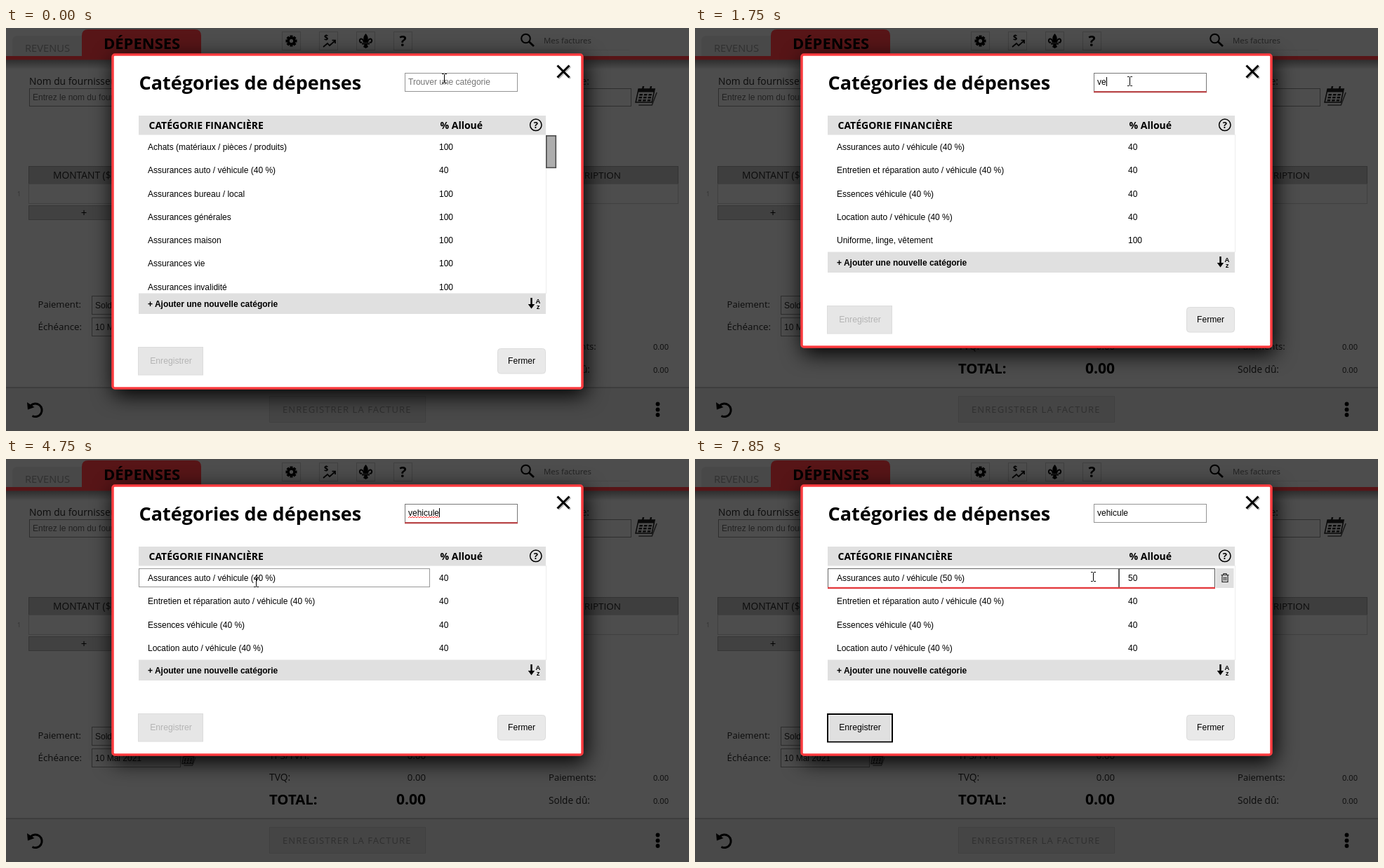
Write an HTML page that moves like this. It is 973 by 575 pixels and loops after 8 s.

```html
<!DOCTYPE html>
<html lang="fr">
<head>
<meta charset="utf-8">
<title>Catégories de dépenses</title>
<style>
html, body { margin: 0; width: 100%; height: 100%; overflow: hidden; background: #4d4d4d; }
svg { display: block; }
text { font-family: "Liberation Sans", Arial, sans-serif; white-space: pre; }
.ui { font-family: "Open Sans", "Noto Sans", sans-serif; }
.b { font-weight: 700; }
.mid { text-anchor: middle; }
.end { text-anchor: end; }
#frame { filter: drop-shadow(3px 8px 15px #000); }
</style>
</head>
<body>
<svg width="973" height="575" viewBox="0 0 973 575">
  <linearGradient id="shade" x2="0" y2="1">
    <stop stop-opacity=".4"/>
    <stop offset="1" stop-opacity="0"/>
  </linearGradient>
  <g id="page"></g>
  <rect id="frame" x="152" y="38" width="669" rx="3" fill="#fff" stroke="#fd3b3f" stroke-width="3.5"/>
  <g id="dialog"></g>
</svg>
<script>
const $ = id => document.getElementById(id);
const text = (x, y, s, size = 12, cls = '', fill = '#000', extra = '') =>
  `<text x="${x}" y="${y}" font-size="${size}" class="${cls}" fill="${fill}" ${extra}>${s}</text>`;
const box = (x, y, w, h, fill, stroke = 'none', extra = '') =>
  `<rect x="${x}" y="${y}" width="${w}" height="${h}" fill="${fill}" stroke="${stroke}" ${extra}/>`;
const line = (d, width = 1, color = '#000', extra = '') =>
  `<path d="${d}" fill="none" stroke="${color}" stroke-width="${width}" ${extra}/>`;
const shape = (d, fill = '#000') => `<path d="${d}" fill="${fill}"/>`;

const pen = document.createElement('canvas').getContext('2d');
pen.font = '12px "Liberation Sans", Arial, sans-serif';
const widthOf = s => pen.measureText(s).width;

// Dimmed page behind the dialog
function calendar(x, y, k) {
  let s = line('M8 27H27L30 9', 1.6, '#1a1a1a') + box(3, 4, 23, 19, '#4d4d4d', '#0a0a0a', 'stroke-width="1.6"');
  s += box(3, 4, 23, 4.5, '#0a0a0a');
  for (let i = 0; i < 9; i++) s += box(6 + i % 3 * 6.5, 11 + (i / 3 | 0) * 4, 4.5, 2.6, '#0a0a0a');
  s += line('M9 0V5M20 0V5', 2.5, '#0a0a0a');
  return `<g transform="translate(${x} ${y}) scale(${k}) skewX(-12)">${s}</g>`;
}

function gear(x, y) {
  let s = '';
  for (let i = 0; i < 8; i++) s += box(-2, -8, 4, 5, '#000', 'none', `transform="rotate(${i * 45})"`);
  return `<g transform="translate(${x} ${y})">${s}<circle r="4.3" fill="none" stroke="#000" stroke-width="3.2"/></g>`;
}

function drawPage() {
  const ink = '#0c0c0c', edge = '#2e2e2e', soft = '#222', red = '#571517';
  let s = box(0, 0, 973, 575, '#4d4d4d');
  s += shape('M9 40V19Q9 11 17 11H108V40Z', '#484848') + box(0, 40, 973, 5.5, red) + box(0, 45.5, 973, 14, 'url(#shade)');
  s += shape('M108 41V11Q108 2 117 2H269Q278 2 278 11V41Z', red);
  s += text(27, 34, 'REVENUS', 14.7, 'ui', '#303030') + text(139, 30, 'DÉPENSES', 22, 'ui b');

  for (const x of [393.5, 446.5, 499.5, 552.5]) s += box(x, 5.5, 26, 26, '#4d4d4d', '#404040');
  s += gear(406.5, 18.5);
  s += text(453, 17, '$', 11, 'ui b') + line('M452 27L458 22L461 25L469 18M464.5 17.5H469V22', 1.7);
  s += shape('M512.5 8C518 14 515 18 514 21H511C510 18 507 14 512.5 8Z');
  s += line('M510 21C509 14 503 14 504 19Q505 22 507 20M515 21C516 14 522 14 521 19Q520 22 518 20M507 22.5H518', 2);
  s += shape('M511 23H514L516 27L512.5 29L509 27Z');
  s += text(565.5, 26, '?', 21, 'ui b mid');
  s += '<circle cx="740.5" cy="15" r="6.3" fill="none" stroke="#000" stroke-width="2"/>' + line('M745 19.5L752 26', 2.8);
  s += text(766, 22, 'Mes factures', 11.4, 'ui', soft) + line('M733 31.5H888', 1, '#484848');

  s += text(33, 81, 'Nom du fournisseur:', 13.8, 'ui', ink) + box(33.5, 86.5, 300, 25, '#4d4d4d', edge);
  s += text(38, 103, 'Entrez le nom du fournisseur', 12, '', soft);
  s += text(831, 81, 'Date:', 13.8, 'ui end', ink) + box(690.5, 86.5, 200, 25, '#4d4d4d', edge) + calendar(899, 83, 1);

  s += box(32.5, 197.5, 925, 25, '#3e3e3e', '#333') + box(32.5, 222.5, 925, 28, '#4d4d4d', '#404040');
  s += text(67, 215, 'MONTANT ($)', 13.8, 'ui', ink) + text(876, 215, 'DESCRIPTION', 13.5, 'ui end', ink);
  s += text(16, 240, '1', 9, 'ui', '#343434') + box(32.5, 253.5, 160, 20, '#414141', '#363636');
  s += text(111, 269, '+', 15, 'ui mid');

  s += text(45.5, 399, 'Paiement:', 13.1, 'ui', ink) + text(45.5, 430.5, 'Échéance:', 13.4, 'ui', ink);
  s += box(122.5, 382.5, 126, 26, '#4d4d4d', edge) + text(127, 400, 'Solde dû', 12, '', ink);
  s += box(122.5, 413.5, 126, 26, '#4d4d4d', edge) + text(127, 431, '10 Mai 2021', 12, '', ink);
  s += calendar(252, 420, .64);

  s += text(375, 428, 'TPS/TVH:', 13.5, 'ui', ink) + text(598, 428, '0.00', 13.2, 'ui end', ink);
  s += text(375, 459, 'TVQ:', 13.8, 'ui', ink) + text(598, 458.5, '0.00', 13.2, 'ui end', ink);
  s += text(375, 493, 'TOTAL:', 20.3, 'ui b') + text(598, 493, '0.00', 21, 'ui b end');
  s += text(773, 459, 'Paiements:', 13.1, 'ui', ink) + text(944, 459, '0.00', 11.1, 'ui end', ink);
  s += text(773, 491.5, 'Solde dû:', 13.6, 'ui', ink) + text(944, 491.5, '0.00', 11.1, 'ui end', ink);

  s += box(0, 513, 973, 62, '#494949') + line('M0 513H973', 1, '#303030');
  s += box(375.5, 525.5, 222, 37, '#454545', '#404040');
  s += text(394, 548.5, 'ENREGISTRER LA FACTURE', 13, 'ui', '#2f2f2f', 'letter-spacing="1.1"');
  s += line('M35 539A9.3 9.3 0 1 1 37.5 553.5', 3) + shape('M30 534L31 544.5L40.5 541Z');
  for (const y of [536.5, 544.5, 552]) s += `<circle cx="928.5" cy="${y}" r="2.9"/>`;
  $('page').innerHTML = s;
}

// Timeline
const LOOP = 8000, STEP = 50, ROW = 33.25, BLINK = 530;
const WORD = 'vehicule';
const typedAt = [1200, 1650, 2000, 2350, 2600, 2750, 3050, 3270];
const filteredAt = [1250, 1750, 2100];
const FOCUS = 400, EDIT = 5850;
const pointer = [
  [0, 624, 72], [50, 624, 74], [150, 624, 74], [400, 626, 75], [500, 626, 75], [650, 614, 76], [750, 619, 76],
  [3650, 619, 76], [3800, 605, 119], [4000, 605, 119], [4300, 470, 160], [4550, 352, 172], [4650, 352, 172],
  [4750, 356, 176], [5000, 480, 205], [5200, 590, 190], [5400, 680, 168], [5550, 680, 168], [5700, 676, 168],
  [EDIT, 676, 168], [6350, 567, 168], [LOOP, 567, 168]
];
const categories = [
  ['Achats (matériaux / pièces / produits)', 100],
  ['Assurances auto / véhicule (40 %)', 40],
  ['Assurances bureau / local', 100],
  ['Assurances générales', 100],
  ['Assurances maison', 100],
  ['Assurances vie', 100],
  ['Assurances invalidité', 100],
  ['Entretien et réparation auto / véhicule (40 %)', 40],
  ['Essences véhicule (40 %)', 40],
  ['Frais de transport et livraison', 100],
  ['Frais de voyage professionnels', 100],
  ['Location auto / véhicule (40 %)', 40],
  ['Uniforme, linge, vêtement', 100]
];

const plain = s => s.normalize('NFD').replace(/[\u0300-\u036f]/g, '').toLowerCase();
const passed = (times, t) => times.filter(k => k <= t).length;
const caretOn = (t, since) => Math.floor((t - since) / BLINK) % 2 === 0;
const caret = (x, y) => line(`M${Math.round(x) + .5} ${y - 7}v13`);

function pointerAt(t) {
  const i = pointer.findIndex(p => p[0] > t);
  const [t0, x0, y0] = pointer[i - 1], [t1, x1, y1] = pointer[i];
  const k = (t - t0) / (t1 - t0);
  return [Math.round(x0 + (x1 - x0) * k), Math.round(y0 + (y1 - y0) * k)];
}

function searchField(t) {
  const n = passed(typedAt, t), word = WORD.slice(0, n), active = t >= FOCUS - 100 && t < EDIT;
  let s = box(568.5, 64.5, 160, 26, '#fff', active ? '#777' : '#949494');
  if (active) s += box(568, 90, 161, 2.3, '#b9474a');
  s += n ? text(573, 81, word) : text(573, 81, 'Trouver une catégorie', 12, '', '#757575');
  if (active && caretOn(t, n ? typedAt[n - 1] : FOCUS)) s += caret(573 + widthOf(word), 77);
  if (t >= 4050 && active) s += line('M573 84' + 'l2 -2l2 2'.repeat(11), 1, '#f33');
  return s;
}

function rowFields(t, rows, x, y) {
  if (t >= EDIT) {
    return box(189.5, 156.5, 414, 27, '#fff', '#666') + box(604.5, 156.5, 136, 27, '#fff', '#555') +
      box(189, 182.8, 552, 2.4, '#e33a3e') + box(742, 156, 25.5, 28, '#e0e0e0') +
      line('M749.5 165.5H760.5M753 165V163.5H757V165M751 166V175.5H759V166M753.7 168V173.5M756.3 168V173.5', 1.2, '#222');
  }
  const i = Math.floor((y - 153.5) / ROW), top = Math.round(156 + i * ROW) + .5;
  if (i < 0 || i >= rows.length || y > top + 27 || x > 740) return '';
  return x < 604 ? box(189.5, top, 414, 26, '#fff', '#999') : box(604.5, top, 136, 26, '#fff', '#999');
}

function percentEditor(t, x) {
  const value = t < 7250 ? '40' : t < 7300 ? '5' : '50';
  const chosen = t >= 7250 ? 0 : x < 621 ? 2 : x < 627 ? 1 : 0;
  let s = text(617, 174, value);
  if (chosen) {
    const left = 617 + (2 - chosen) * widthOf('0');
    s += box(left, 163, 631 - left, 14, '#0078d7') + text(left, 174, value.slice(2 - chosen), 12, '', '#fff');
  } else if (caretOn(t, t < 7250 ? EDIT : t < 7300 ? 7250 : 7300)) {
    s += caret(617 + widthOf(value), 170);
  }
  return s;
}

function draw(t) {
  const [px, py] = pointerAt(t);
  const query = t >= 3300 ? WORD : WORD.slice(0, passed(filteredAt, t));
  const rows = categories.filter(c => plain(c[0]).includes(query));
  const foot = Math.min(379, Math.round(153.75 + ROW * rows.length)), saved = t >= 7400;
  $('frame').setAttribute('height', foot + 97);

  let s = text(189.5, 88, 'Catégories de dépenses', 27, 'ui b') + searchField(t);
  s += line('M787 55L804 72M804 55L787 72', 3, '#bbb') + line('M785.5 53.5L802.5 70.5M802.5 53.5L785.5 70.5', 3);
  s += box(189, 125, 580, 27.5, '#e0e0e0') + line(`M769.5 152V${foot}`, 1, '#eee');
  s += text(203.5, 144, 'CATÉGORIE FINANCIÈRE', 14, 'ui b') + text(618.5, 144, '% Alloué', 14, 'ui b');
  s += '<circle cx="754.8" cy="138.3" r="8.2" fill="none" stroke="#000" stroke-width="1.5"/>' + text(754.8, 143, '?', 13, 'ui b mid');

  s += rowFields(t, rows, px, py);
  rows.slice(0, 7).forEach(([name, part], i) => {
    const y = Math.round(174 + i * ROW), editing = t >= EDIT && i === 0;
    s += text(202, y, editing && saved ? name.replace('40', '50') : name);
    s += editing ? percentEditor(t, px) : text(617, y, part);
  });
  if (rows.length > 7) s += box(769.8, 153.8, 13.5, query ? 151.5 : 45.5, '#adadad', '#4c4c4c', 'stroke-width="1.6"');

  s += `<g transform="translate(0 ${foot - 379})">` + box(189, 378.5, 580, 29.5, '#e0e0e0');
  s += text(202, 397.5, '+ Ajouter une nouvelle catégorie', 12, 'b');
  s += line('M748.5 385V396', 2.4) + shape('M743.8 394H753.2L748.5 400.5Z');
  s += text(758, 392.5, 'A', 9.5, 'b mid') + text(758, 401, 'z', 9.5, 'b mid');
  s += saved
    ? box(189, 456, 92, 39.5, '#e0e0e0', '#000', 'stroke-width="2"') + box(190.5, 457.5, 89, 36.5, 'none', '#f4f4f4')
    : box(188.5, 455.5, 92, 39.5, '#e6e6e6', '#dcdcdc');
  s += text(235, 479, 'Enregistrer', 12.2, 'mid', saved ? '#000' : '#b4b4b4');
  s += box(700.5, 457.5, 68, 35.5, '#e9e9e9', '#dcdcdc', 'rx="4"') + text(734.5, 479, 'Fermer', 12.1, 'mid') + '</g>';

  s += line(`M${px - 3} ${py - 6.5}h2.5l1 1l1 -1h2.5M${px - 3} ${py + 6.5}h2.5l1 -1l1 1h2.5M${px + .5} ${py - 5.5}v11`);
  $('dialog').innerHTML = s;
}

drawPage();
let last = -1;
const start = performance.now();
function tick() {
  const t = Math.floor((performance.now() - start) % LOOP / STEP) * STEP;
  if (t !== last) draw(last = t);
  requestAnimationFrame(tick);
}
tick();
</script>
</body>
</html>
```
